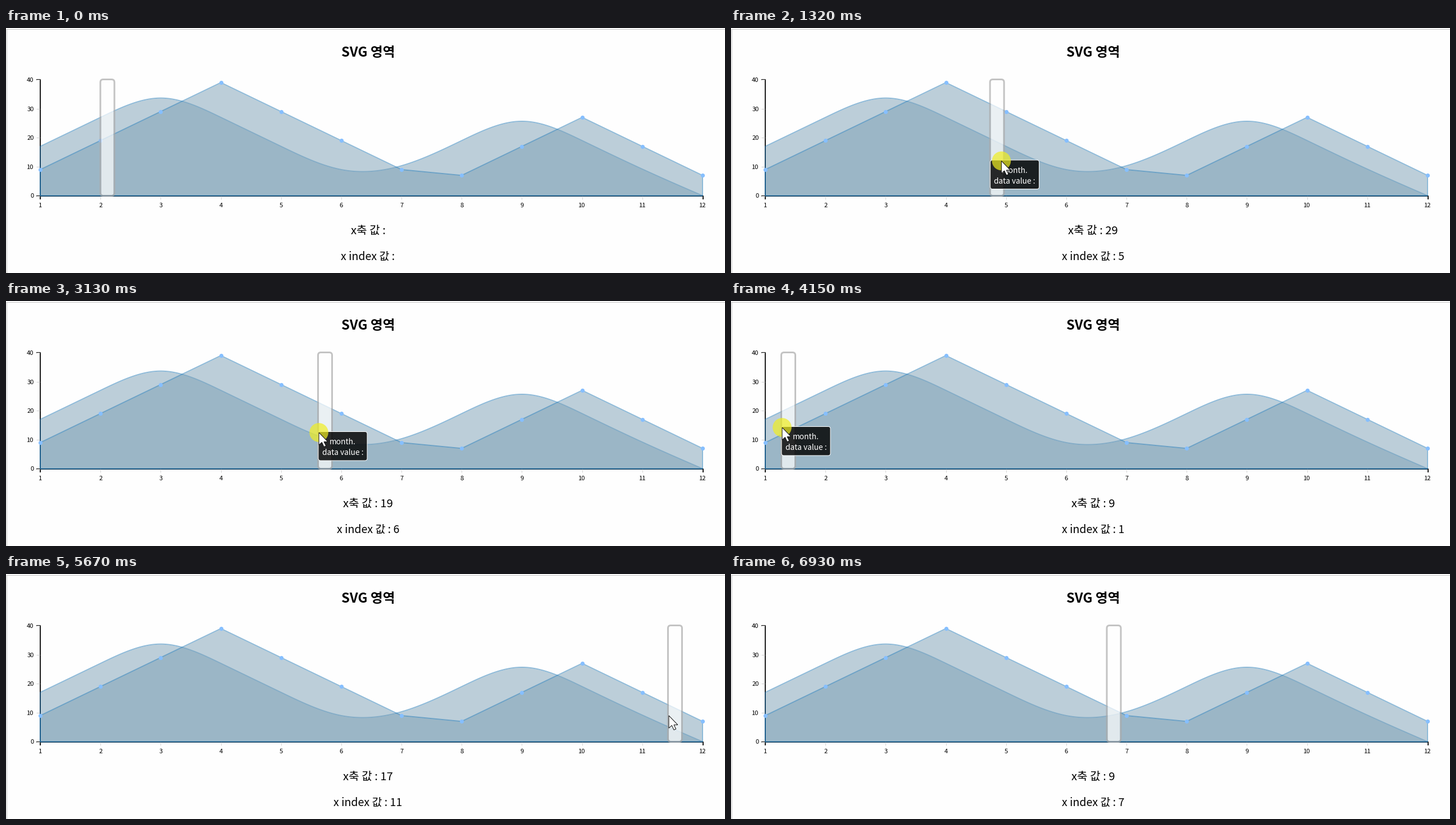
Animation, 1280 px wide and 436 px high, one loop 7.66 s. Source, as a matplotlib script:

```python
import numpy as np
import matplotlib.pyplot as plt
from matplotlib.animation import FuncAnimation
from matplotlib.collections import LineCollection
from matplotlib.patches import Circle, FancyBboxPatch, Polygon

W, H, DPI = 1280, 436, 80
LOOP, STEP, SAMPLE = 7660, 20, 70
PT = 72 / DPI

X0, X1, BASE, TOP = 61, 1240, 298.5, 92
UNIT = (X1 - X0) / 11
MONTHS = np.arange(12)
LINE = np.interp(MONTHS, [0, 3, 6, 7, 9, 11], [9, 39, 9, 7, 27, 7])
SMOOTH = np.interp(MONTHS, [0, 2, 5, 6, 8, 10, 11], [17, 37, 7, 9, 29, 9, 0])
FILL, STROKE = (123 / 255, 159 / 255, 181 / 255), "#1f77b4"

plt.rcParams["font.family"] = ["Noto Sans CJK JP", "DejaVu Sans"]
fig = plt.figure(figsize=(W / DPI, H / DPI), dpi=DPI, facecolor="#fefefe")
ax = fig.add_axes([0, 0, 1, 1])
ax.set(xlim=(0, W), ylim=(H, 0))
ax.axis("off")


def y_px(v):
    return BASE - np.asarray(v) * (BASE - TOP) / 40


def label(x, y, text, size, **kw):
    kw = {"ha": "center", "va": "baseline", "color": "black", **kw}
    return ax.text(x, y, text, fontsize=size * PT, **kw)


def segments(lines, color, width, z):
    ax.add_collection(LineCollection(lines, colors=color, linewidths=width * PT,
                                     zorder=z, capstyle="butt"))


def rounded(x, y, w, h, r, **kw):
    box = FancyBboxPatch((x, y), w, h, boxstyle=f"round,pad=0,rounding_size={r}", **kw)
    return ax.add_patch(box)


def basis(data):
    """Uniform cubic B-spline with clamped ends, as (x, y) samples."""
    pts = np.pad(np.column_stack([MONTHS, data]), ((2, 2), (0, 0)), mode="edge")
    u = np.linspace(0, 1, 40, endpoint=False)[:, None]
    out = [((1 - u) ** 3 * a + (3 * u**3 - 6 * u**2 + 4) * b
            + (-3 * u**3 + 3 * u**2 + 3 * u + 1) * c + u**3 * d) / 6
           for a, b, c, d in zip(pts, pts[1:], pts[2:], pts[3:])]
    return np.vstack(out + [pts[-1:]]).T


GRID = np.linspace(0, 11, 661)
XS = X0 + GRID * UNIT


class Area:
    """Area whose outline and fill share one opacity."""

    def __init__(self, values, z):
        self.ys = y_px(values)
        self.slope = np.hypot(1, np.gradient(self.ys, XS))
        outline = np.vstack([np.column_stack([XS, self.ys]), [(X1, BASE), (X0, BASE)]])
        self.fill = Polygon(outline, fc=FILL, ec="none", alpha=0.5, zorder=z)
        self.edge = Polygon(outline, fc="none", ec=STROKE, alpha=0.5, zorder=z + 0.1,
                            joinstyle="bevel")
        ax.add_patch(self.fill)
        ax.add_patch(self.edge)
        self.width = 0
        self.set_width(2)

    def set_width(self, width):
        if width == self.width:
            return
        self.width, h = width, width / 2
        xs = np.clip(XS, X0 + h, X1 - h)
        ys = np.minimum(self.ys + h * self.slope, BASE - h)
        self.fill.set_xy(np.vstack([np.column_stack([xs, ys]),
                                    [(X1 - h, BASE - h), (X0 + h, BASE - h)]]))
        self.edge.set_linewidth(width * PT)

    def top(self, x):
        return np.interp(x, XS, self.ys)


# page border and title
segments([[(0, 2), (W, 2)], [(0.5, 2), (0.5, H)], [(0, H - 0.5), (W, H - 0.5)]],
         "#c4c4c4", 1, 1)
label(644.2, 51, "SVG 영역", 23.7, weight="bold")

# axes
segments([[(54, TOP), (X0, TOP), (X0, BASE), (54, BASE)],
          [(X0, 305), (X0, BASE), (X1 + 0.5, BASE), (X1 + 0.5, 305)]], "#1a1a1a", 2, 1)
segments([[(54, y_px(v)), (60, y_px(v))] for v in range(0, 41, 10)]
         + [[(X0 + i * UNIT, 299), (X0 + i * UNIT, 305)] for i in MONTHS[1:-1]],
         "#d3d3d3", 1, 1.1)
for v in range(0, 41, 10):
    label(49.5, y_px(v) + 4, str(v), 11.2, ha="right")
for i in MONTHS:
    label(X0 + i * UNIT, 319, str(i + 1), 11.2)

# charts
smooth = Area(np.interp(GRID, *basis(SMOOTH)), 2)
line = Area(np.interp(GRID, MONTHS, LINE), 3)
ax.plot(X0 + MONTHS * UNIT, y_px(LINE), "o", ms=7.2 * PT, mfc="#86bfff",
        mec="none", zorder=4)

# sliding handle
handle_fill = rounded(0, 93, 22, 204, 3.5, fc="white", ec="none", alpha=0.7, zorder=5)
handle_edge = rounded(0, 91.5, 25, 207, 5, fc="none", ec="#aaaaaa", lw=3 * PT,
                      alpha=0.7, zorder=5.1)

# readouts
value_text = label(644.5, 367.5, "", 20.2)
index_text = label(644.5, 412.5, "", 19.5)

# tooltip and pointer
tip_box = rounded(0, 0, 87, 51.5, 4, fc=(0, 0, 0, 0.83), ec="white", lw=PT, zorder=6)
tip_head = label(0, 0, "month.", 13.7, color="white", zorder=7)
tip_body = label(0, 0, "data value :", 13.7, color="white", zorder=7)
tooltip = (tip_box, tip_head, tip_body)
halo = ax.add_patch(Circle((0, 0), 16.8, fc="#f0ee20", ec="none", alpha=0.7, zorder=8))
ARROW = 1.06 * np.array([(0, 0), (0, 21), (5, 16.5), (8.5, 24), (12, 22.5),
                         (8.5, 15.5), (15, 15.5)])
arrow = ax.add_patch(Polygon(ARROW, fc="white", ec="#111111", lw=PT, zorder=9,
                             joinstyle="miter"))

# pointer moves: begin, end, x and y reached
ENTRY = (300, 432)
MOVES = [(130, 840, 169.5, 237), (970, 1690, 827.5, 236), (1870, 1940, 822, 253),
         (2160, 2860, 557, 234), (3130, 3270, 612, 236), (3270, 3690, 91, 225),
         (4090, 4720, 1127, 251), (5120, 5470, 1180, 252), (5800, 6430, 670.5, 248),
         (6430, 6640, 1000, 445)]
DRAGS = [(970, 1670), (2160, 4720), (5120, 5400), (5800, 6360)]
SHOWN = (130, 6640)
LAG, GRIP = 11, -1.5


def pointer(t):
    pos = np.array(ENTRY, float)
    for begin, end, x, y in MOVES:
        u = np.clip((t - begin) / (end - begin), 0, 1)
        pos += (np.array([x, y]) - pos) * u**3 * (6 * u * u - 15 * u + 10)
    return pos


def handle_x(t):
    """The handle trails the pointer and stays where it is released."""
    begin, end = [d for d in DRAGS if d[0] <= max(t, DRAGS[0][0])][-1]
    return pointer(np.clip(t, begin, end + SAMPLE) - LAG)[0] + GRIP


def dragging(t, linger=0):
    return any(a <= t < b + linger for a, b in DRAGS)


def hovered(px, py, hx):
    """Topmost area below the pointer, unless the handle covers it."""
    if py > BASE or hx - 1.5 <= px <= hx + 26.5:
        return None
    return next((a for a in (line, smooth) if py > a.top(px)), None)


def draw(i):
    now = i * STEP + STEP / 2
    begin = max([0] + [m[0] for m in MOVES if m[0] <= now])
    t = begin + (now - begin) // SAMPLE * SAMPLE
    px, py = pointer(t)
    hx = handle_x(t)
    pressed, shown = dragging(now), SHOWN[0] <= now < SHOWN[1]

    handle_edge.set_x(hx)
    handle_fill.set_x(hx + 1.5)
    target = hovered(px, py, hx) if shown and not pressed else None
    for area in (smooth, line):
        area.set_width(4 if area is target else 2)

    value = index = ""
    if now >= DRAGS[0][0]:
        k = int(np.clip(round((hx - X0) / UNIT), 0, 11))
        value, index = f" {LINE[k]:.0f}", f" {k + 1}"
    value_text.set_text("x축 값 :" + value)
    index_text.set_text("x index 값 :" + index)

    for part in tooltip:
        part.set_visible(dragging(now, SAMPLE))
    left, top = hx + 0.5, py - 1.5
    tip_box.set_x(left)
    tip_box.set_y(top)
    tip_head.set_position((left + 43.5, top + 22.5))
    tip_body.set_position((left + 43.5, top + 41.5))

    halo.set_visible(pressed)
    halo.set_center((px, py))
    arrow.set_visible(shown)
    arrow.set_xy(ARROW + (px, py))
    return []


anim = FuncAnimation(fig, draw, frames=LOOP // STEP, interval=STEP, repeat=True,
                     repeat_delay=0, init_func=lambda: draw(0), blit=False)
plt.show()
```
